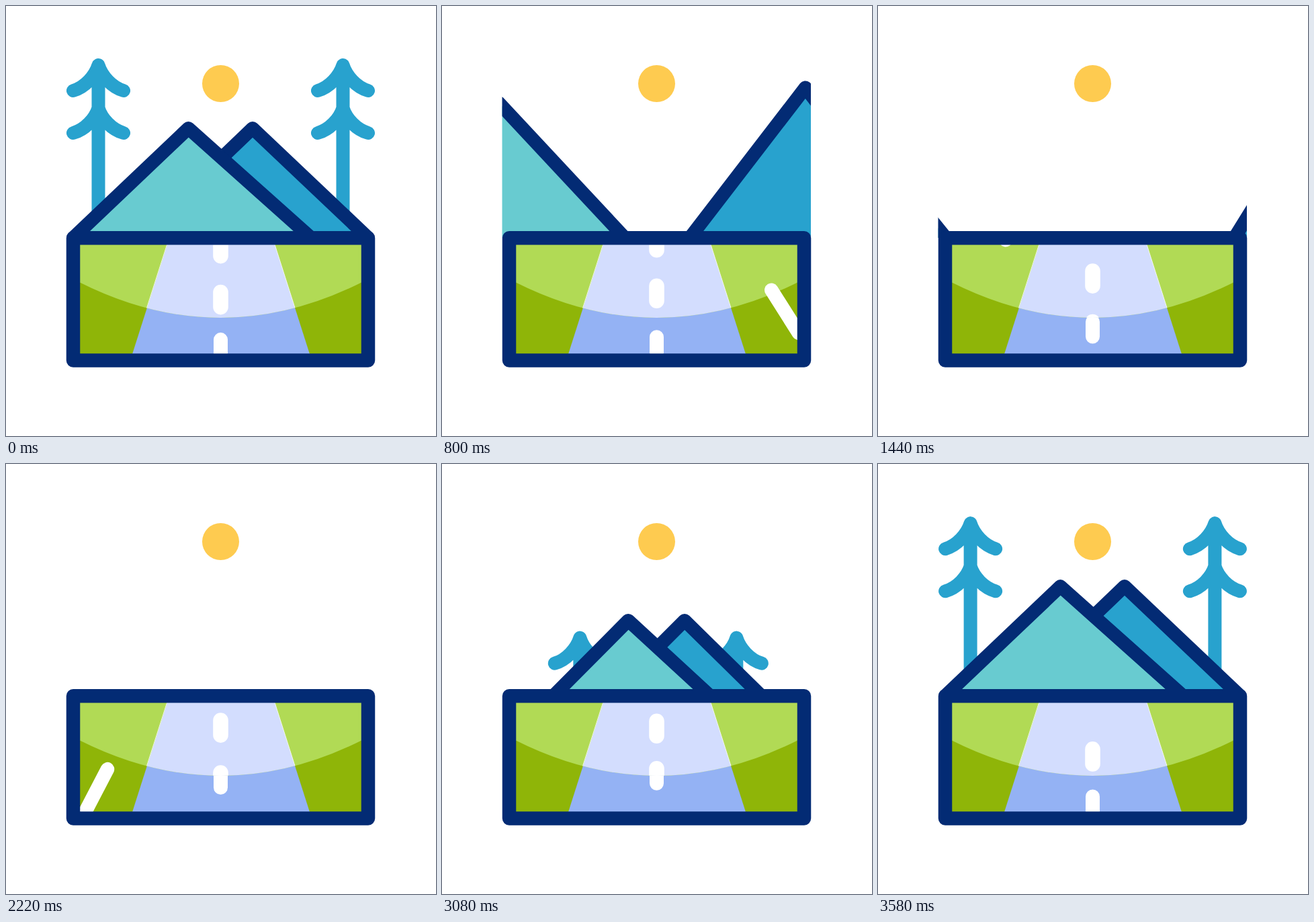
These frames come from a looping animation (640 by 640 pixels, 3.6 s). An HTML page:

```html
<!DOCTYPE html>
<html lang="en">
<head>
<meta charset="utf-8">
<title>Road trip</title>
<style>
  html, body { margin: 0; width: 100%; height: 100%; overflow: hidden; background: #fff; }
  svg { display: block; width: 100vw; height: 100vh; }
  path, line { stroke-linecap: round; stroke-linejoin: round; }
  .tree { fill: none; stroke: #28a2ce; stroke-width: 20; }
  .peak { stroke: #032b74; stroke-width: 20; }
  .mark { fill: none; stroke: #fff; }
</style>
</head>
<body>
<svg viewBox="0 0 640 640">
  <defs>
    <clipPath id="sky"><rect x="89.5" width="459.5" height="345"/></clipPath>
    <clipPath id="window"><rect x="109" y="354" width="421" height="164"/></clipPath>
    <clipPath id="shine"><path d="M109 354H530V411Q319.5 517 109 411Z"/></clipPath>
    <path id="road" d="M240 355H400L452 518H188Z"/>
    <path id="dashes"/>
    <path id="pine" d="M0 88V420M-37.5 126C-20 121-5 104 0 88C5 104 20 121 37.5 126M-37.5 189C-20 184-5 168 0 152C5 168 20 184 37.5 189"/>
  </defs>
  <circle cx="319.5" cy="115.5" r="27.5" fill="#fecb50"/>
  <g id="scenery" clip-path="url(#sky)">
    <use id="treeL" class="tree" href="#pine"/>
    <use id="treeR" class="tree" href="#pine"/>
    <path id="peakR" class="peak" fill="#28a2ce"/>
    <path id="peakL" class="peak" fill="#68cbd0"/>
  </g>
  <g clip-path="url(#window)">
    <rect x="100" y="345" width="439" height="183" fill="#8fb508"/>
    <use href="#road" fill="#94b2f4"/>
    <use href="#dashes" class="mark" stroke-width="21"/>
    <g clip-path="url(#shine)">
      <rect x="100" y="345" width="439" height="183" fill="#b1da55"/>
      <use href="#road" fill="#d3ddfe" stroke="#fff" stroke-width=".8"/>
      <use href="#dashes" class="mark" stroke-width="22.6"/>
    </g>
    <line id="sideR" class="mark" stroke-width="20.5"/>
    <line id="sideL" class="mark" stroke-width="20.5"/>
  </g>
  <rect x="100" y="345.3" width="439" height="182.2" fill="none" stroke="#032b74" stroke-width="20.5" stroke-linejoin="round"/>
</svg>
<script>
const LOOP = 3600, LEAVE_END = 1600, RISE_START = 2200;
const $ = id => document.getElementById(id);
const ease = u => u * u * (3 - 2 * u);
const mix = (a, b, s) => a.map((v, i) => v + (b[i] - v) * s);

// Poses: hidden below, at home, gone to the side.
const peaks = { // left foot x, top x, top y, right foot x
  peakL: [[312, 290, 346, 277], [100, 271.5, 182, 454], [-251, -102, 106, 91]],
  peakR: [[364, 348, 346, 333], [197, 367, 182, 539], [540, 714, 61, 885]]
};
const trees = { // x, y
  treeL: [[356, 550], [137.5, 0], [-132.5, 0]],
  treeR: [[298, 550], [501.5, 0], [771.5, 0]]
};
// Side markings: start time, end time, x1 y1 x2 y2 and their speeds per ms.
const sides = {
  sideR: [0, 1400, [417, 329, 424, 340], [.0915, .117, .1335, .1835]],
  sideL: [1440, 2760, [192, 337, 190, 348], [-.0525, .15, -.102, .236]]
};

$('dashes').setAttribute('d',
  [485.5, 415, 339, 263.5, 185.5, 115].map(y => `M319.5 ${y + 11}v22`).join(''));

function draw(t) {
  const rising = t >= RISE_START;
  const s = ease(rising ? (t - RISE_START) / (LOOP - RISE_START) : Math.min(1, t / LEAVE_END));
  const pose = ([low, home, away]) => rising ? mix(low, home, s) : mix(home, away, s);

  $('scenery').style.display = t > LEAVE_END && !rising ? 'none' : '';
  for (const id in peaks) {
    const [a, x, y, b] = pose(peaks[id]);
    $(id).setAttribute('d', `M${a} 345L${x} ${y}L${b} 345`);
  }
  for (const id in trees)
    $(id).setAttribute('transform', `translate(${pose(trees[id])})`);

  $('dashes').setAttribute('transform', `translate(0 ${t / 12})`);
  for (const id in sides) {
    const [from, to, start, speed] = sides[id];
    $(id).style.display = t >= from && t < to ? '' : 'none';
    ['x1', 'y1', 'x2', 'y2'].forEach((name, i) =>
      $(id).setAttribute(name, start[i] + speed[i] * (t - from)));
  }
}

const begin = performance.now();
function tick() {
  draw((performance.now() - begin) % LOOP);
  requestAnimationFrame(tick);
}
tick();
</script>
</body>
</html>
```
